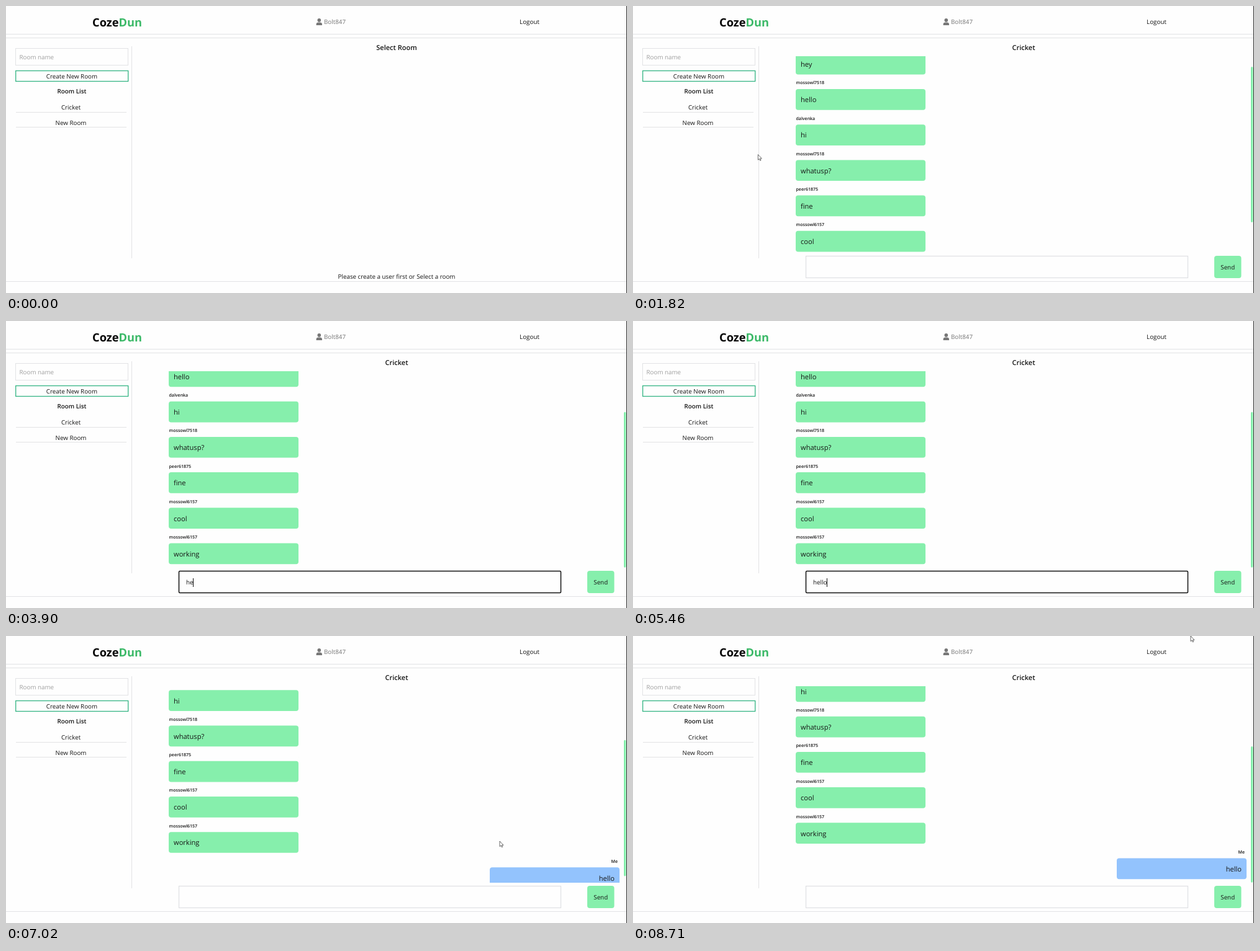
An HTML page that plays this animation: 1000x463 px, repeating every 9230 ms.

```html
<!DOCTYPE html>
<html lang="en">
<head>
<meta charset="utf-8">
<title>Chat room</title>
<style>
  html, body { margin: 0; width: 100%; height: 100%; overflow: hidden; background: #fefefe; }
  svg { display: block; width: 1000px; height: 463px; }
  text {
    font: 9.8px "Open Sans", "Noto Sans", sans-serif;
    fill: #151515;
    text-rendering: geometricPrecision;
    white-space: pre;
  }
  .mid { text-anchor: middle; }
  .end { text-anchor: end; }
  .logo { font-size: 18.3px; font-weight: 700; fill: #050505; }
  .title { font-size: 11px; font-weight: 600; }
  .semi { font-weight: 600; }
  .grey { fill: #777; }
  .hint { fill: #a0a0a0; }
  .msg { font-size: 11.1px; }
  .name { font-size: 7px; font-weight: 600; }
  .rule { stroke: #e2e3e5; fill: none; }
</style>
</head>
<body>
<svg id="stage" viewBox="0 0 1000 463">
  <defs><clipPath id="view"><rect x="205" y="81" width="789" height="317"/></clipPath></defs>
</svg>
<script>
const LOOP = 9230, STEP = 130;
const GREEN = '#86efac', BLUE = '#93c3fd';
const ROW = 57.2, VIEW_TOP = 81, VIEW_H = 317;
const stage = document.getElementById('stage');

function add(tag, attrs, parent = stage) {
  const el = document.createElementNS('http://www.w3.org/2000/svg', tag);
  for (const k in attrs) el.setAttribute(k, attrs[k]);
  parent.appendChild(el);
  return el;
}
function text(str, x, y, cls = '', parent = stage) {
  const el = add('text', { x, y, class: cls }, parent);
  el.textContent = str;
  return el;
}
const rule = d => add('path', { d, class: 'rule' });
const box = (x, y, width, height, attrs, parent) =>
  add('rect', { x, y, width, height, ...attrs }, parent);
const show = (el, on) => el.setAttribute('visibility', on ? 'inherit' : 'hidden');

// Header
const logo = text('Coze', 139, 33, 'logo');
const tail = add('tspan', { fill: '#3cb968' }, logo);
tail.textContent = 'Dun';
add('circle', { cx: 504.3, cy: 22.9, r: 2.8, fill: '#777' });
add('path', { d: 'M499.6 31v-1.2q0-3.2 3.2-3.2h3q3.2 0 3.2 3.2v1.2z', fill: '#777' });
text('Bolt847', 512, 29, 'grey');
text('Logout', 843, 29, 'mid');
rule('M0 45.5H999M0 51.5H999M0 444.5H999');

// Sidebar
rule('M202.5 65V407M16 171.5H194M16 195.5H194');
box(15.5, 68.5, 181, 27, { class: 'rule' });
text('Room name', 21.5, 86, 'hint');
box(15.7, 104.5, 181, 17, { fill: 'none', stroke: '#35b584', 'stroke-width': 1.3 });
text('Create New Room', 106, 117, 'mid');
text('Room List', 106, 141.3, 'mid semi');
text('Cricket', 104.5, 167, 'mid');
text('New Room', 104.5, 191.5, 'mid');

// Before a room is chosen
const title = text('', 629, 71, 'mid title');
const notice = text('Please create a user first or Select a room', 629, 440.3, 'mid');

// Chat room
const room = add('g', {});
const clip = add('g', { 'clip-path': 'url(#view)' }, room);
const list = add('g', {}, clip);
const messages = [
  ['mossowl7518', 'hey'],
  ['mossowl7518', 'hello'],
  ['dalvenka', 'hi'],
  ['mossowl7518', 'whatusp?'],
  ['peer61875', 'fine'],
  ['mossowl6157', 'cool'],
  ['mossowl6157', 'working'],
  ['Me', 'hello']
].map(([who, words], i) => {
  const mine = who === 'Me';
  const g = add('g', { transform: `translate(0 ${VIEW_TOP + 17.3 + ROW * i})` }, list);
  text(who, mine ? 985 : 262.5, -7.5, mine ? 'name end' : 'name', g);
  box(mine ? 779 : 262, 0, 209, 33.7, { rx: 4, fill: mine ? BLUE : GREEN }, g);
  text(words, mine ? 980 : 270, 21.3, mine ? 'msg end' : 'msg', g);
  return g;
});
const thumb = box(995, 0, 3.5, 0, { rx: 1.7, fill: GREEN }, room);
const field = box(278.5, 403.5, 615, 35, { fill: '#fefefe' }, room);
const draft = text('', 290, 425.3, '', room);
const caret = box(0, 415, 1, 14, { fill: '#111' }, room);
box(936, 403, 43.5, 36, { rx: 4, fill: GREEN }, room);
text('Send', 957.7, 425.2, 'mid', room);

box(999, 0, 1, 463, { fill: '#2b2b2b' });

// Pointers, both with their tip at 0,0
const outline = { fill: '#fff', stroke: '#444', 'stroke-width': 0.8, 'stroke-linejoin': 'round' };
const arrow = add('path', { d: 'M0 0V8.6L2 6.9L3.4 9.8L4.7 9.2L3.4 6.4H6z', ...outline });
const hand = add('path', {
  d: 'M-.8 .6Q0-.6 .8 .6V4Q2 3.4 2.4 4.4Q3.6 4 3.9 5Q5 4.8 5 6V8.6Q4.6 10 4 11.4H-.6Q-1-.2-.8 .6z' +
     'M-.8 6.4L-2.6 5.6Q-3.4 6.2-2.8 7L-.6 11.4',
  ...outline
});

// [time, x, y]; a null place hides the pointer
const track = [
  [0, null], [130, 250, 310], [650, 128, 206], [780, 128, 206], [910, 116, 186],
  [1040, 116, 186], [1170, 109, 174], [1300, 107, 167], [1690, 107, 167],
  [2080, 390, 385], [2210, null],
  [5720, 897, 417], [5850, 925, 418], [5980, 950, 419], [6110, 938, 414],
  [6240, 913.5, 404], [6370, 900, 394], [6630, 900, 394], [7150, 760, 310],
  [7800, 603, 218], [8190, 690, 150], [8710, 898, 0], [LOOP, 898, 0]
];
function pointerAt(t) {
  const i = track.findIndex(k => k[0] > t);
  const [t0, x0, y0] = track[i - 1], [t1, x1, y1] = track[i];
  if (x0 === null) return null;
  if (x1 === null) return [x0, y0];
  const p = (t - t0) / (t1 - t0);
  return [x0 + (x1 - x0) * p, y0 + (y1 - y0) * p];
}
function ease(t, start, length) {
  const p = Math.min(1, Math.max(0, (t - start) / length));
  return p * p * (3 - 2 * p);
}

const OPEN = 1690, FOCUS = 2730, SEND = 5980, ARRIVE = 6760;
const typing = [[3640, 'h'], [3900, 'he'], [4030, 'hel'], [4160, 'hell'], [4290, 'hello']];

function draw(t) {
  const open = t >= OPEN, arrived = t >= ARRIVE;
  title.textContent = open ? 'Cricket' : 'Select Room';
  show(notice, !open);
  show(room, open);
  show(messages[7], arrived);

  const scroll = 83 * ease(t, OPEN, 390) + ROW * ease(t, ARRIVE, 390);
  const total = ROW * (arrived ? 8 : 7);
  list.setAttribute('transform', `translate(0 ${-scroll})`);
  thumb.setAttribute('y', VIEW_TOP + scroll / total * VIEW_H);
  thumb.setAttribute('height', VIEW_H * VIEW_H / total);

  const focus = t >= FOCUS && t < SEND;
  field.setAttribute('stroke', focus ? '#111' : '#dfe0e3');
  field.setAttribute('stroke-width', focus ? 1.5 : 1.2);
  field.setAttribute('rx', focus ? 1.5 : 0);
  const typed = focus ? typing.filter(k => k[0] <= t).pop() : null;
  draft.textContent = typed ? typed[1] : '';
  const blinkOff = (t >= 3250 && t < 3640) || (t >= 4940 && t < 5460);
  show(caret, focus && !blinkOff);
  caret.setAttribute('x', 290 + (typed ? draft.getComputedTextLength() - 0.5 : 0));

  const at = pointerAt(t);
  const overRoom = at && at[0] < 194 && at[1] > 153 && at[1] < 196;
  const overSend = at && at[0] > 936 && at[1] > 403;
  const link = overRoom || overSend;
  show(arrow, at && !link);
  show(hand, at && link);
  if (at) (link ? hand : arrow).setAttribute('transform', `translate(${at[0]} ${at[1]})`);
}

function tick() {
  const t = performance.now() % LOOP;
  draw(Math.floor(t / STEP) * STEP);
  requestAnimationFrame(tick);
}
tick();
</script>
</body>
</html>
```
